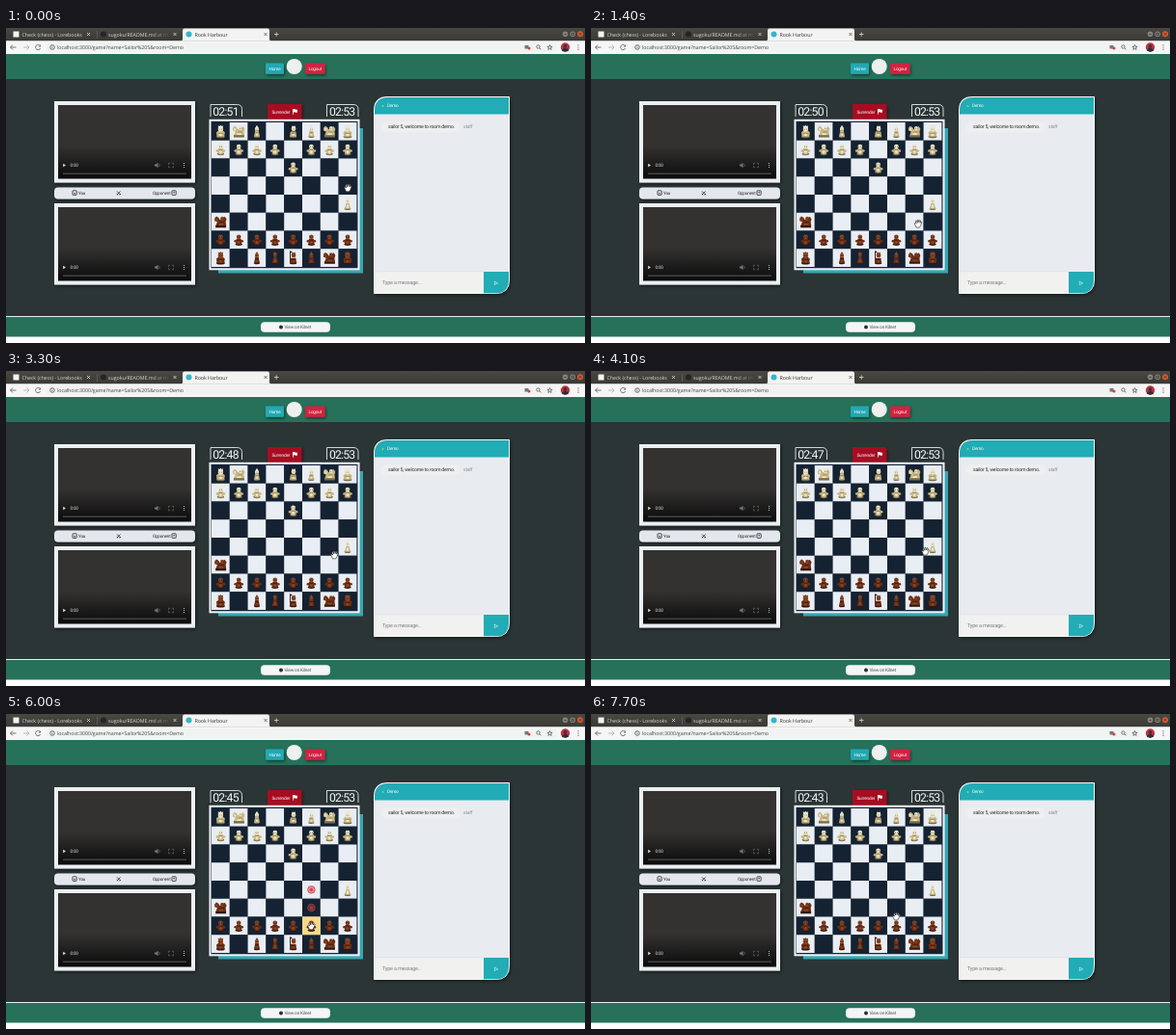
Recreate the animation shown at these times as an HTML page. Size 600x327 px, loop 8000 ms.

```html
<!DOCTYPE html>
<html lang="en">
<head>
<meta charset="utf-8">
<title>Chess room</title>
<style>
html, body { margin: 0; width: 100%; height: 100%; overflow: hidden; background: #fff; }
svg { display: block; width: 600px; height: 327px; }
text { font-family: Roboto, "Liberation Sans", sans-serif; letter-spacing: -.04em; text-rendering: geometricPrecision; }
.ui { font-family: "Open Sans", "Noto Sans", sans-serif; font-size: 5.3px; letter-spacing: -.01em; }
.ln { fill: none; stroke: currentColor; stroke-width: .8; }
.clock { font-size: 12.2px; letter-spacing: -.065em; fill: #f4f6f6; }
.white { --a: #eee6c8; --b: #c8b785; --c: #7a6c45; }
.brown { --a: #8a4623; --b: #6b2d14; --c: #34170b; }
.a { fill: var(--a); } .b { fill: var(--b); } .c { fill: var(--c); }
</style>
</head>
<body>
<svg viewBox="0 0 600 327">
  <defs>
    <linearGradient id="vid" x2="0" y2="1">
      <stop offset=".55" stop-color="#343231"/><stop offset="1" stop-color="#0b0b0b"/>
    </linearGradient>
    <linearGradient id="tabs" x2="0" y2="1">
      <stop stop-color="#4a4843"/><stop offset="1" stop-color="#3a3935"/>
    </linearGradient>
    <linearGradient id="fade">
      <stop offset=".7" stop-color="#dad8d3"/><stop offset="1" stop-color="#dad8d3" stop-opacity=".15"/>
    </linearGradient>
    <filter id="soft" x="-20%" y="-20%" width="140%" height="150%">
      <feDropShadow dx="1" dy="1.500" stdDeviation="1.500" flood-opacity=".5"/>
    </filter>
    <clipPath id="face"><circle cx="579.500" cy="20" r="4.700"/></clipPath>

    <g id="pawn">
      <ellipse class="c" cy="5.300" rx="4.200" ry="1.600"/>
      <circle class="b" cx="-4" cy="1.500" r="1.500"/><circle class="b" cx="4" cy="1.500" r="1.500"/>
      <ellipse class="b" cy="2" rx="3.500" ry="3.800"/>
      <circle class="a" cy="-3.500" r="2.700"/>
      <path class="c" d="M-1.600-3.700h1v1h-1zM.700-3.700h1v1h-1zM-2 .300h4v.700h-4z"/>
      <ellipse class="a" cy="3" rx="1.500" ry="1.600"/>
    </g>
    <g id="rook">
      <ellipse class="c" cy="6" rx="5" ry="1.800"/>
      <path class="b" d="M-5 1q5-5 10 0l-.700 5h-8.600z"/>
      <circle class="a" cy="-2.700" r="3"/>
      <path class="a" d="M-2.700-4l-.300-3 1.700 1L0-7.500 1.300-6 3-7l-.300 3z"/>
      <path class="c" d="M-1.700-3h1v1h-1zM.700-3h1v1h-1zM-3 2h6v.800h-6z"/>
      <ellipse class="a" cy="4" rx="1.800" ry="1.400"/>
    </g>
    <g id="knight">
      <path class="c" d="M-6 4H6.500v3H-6z"/>
      <path class="b" d="M-7-4l2-2.500 2.500 1.500 1.500 2.500 3-1 3-2.500L7-3 6 0l.500 4.500H-5.500L-4 0l-3-1z"/>
      <circle class="a" cx="2" cy="-3.700" r="2.300"/>
      <path class="a" d="M-5.500-4.500l2 1v3l-2-1zM-2 2h5v2h-5z"/>
      <path class="c" d="M1-4h.900v1H1zM3-4h.900v1H3zM-1 .300h5V1h-5z"/>
    </g>
    <g id="bishop">
      <ellipse class="c" cy="6" rx="3.500" ry="1.500"/>
      <path class="b" d="M-2-1h4l1.400 7h-6.800z"/>
      <path class="a" d="M0-7.500Q3-4 2.300-1h-4.600Q-3-4 0-7.500z"/>
      <path class="c" d="M-1.400-3h.900v1h-.900zM.600-3h.900v1H.600zM-2 1h4v.700h-4z"/>
      <path class="a" d="M-.900 3H.900v2H-.900z"/>
    </g>
    <g id="queen">
      <ellipse class="c" cy="6" rx="3.800" ry="1.500"/>
      <path class="b" d="M-1.600-1h3.200L3.600 6h-7.200z"/>
      <circle class="a" cy="-3" r="2.100"/>
      <path class="a" d="M-2-4l-.300-2.500L-1-5.500 0-8l1 2.500 1.300-1L2-4zM-.800 1H.800L1.500 5h-3z"/>
      <path class="c" d="M-1.300-3.300h.800v.900h-.800zM.500-3.300h.800v.900H.500z"/>
    </g>
    <g id="king">
      <path fill="#171410" d="M-4-8.500l3 1.200-2 1.600V6h-1z"/>
      <ellipse class="c" cy="6" rx="4.200" ry="1.600"/>
      <path class="b" d="M-3.200 0h6.400L4 6h-8z"/>
      <circle class="a" cx=".500" cy="-3" r="2.700"/>
      <path class="a" d="M-2-4.500L-1-7l1.500 1.200L2-7l1 2.500z"/>
      <path class="c" d="M-.900-3.300h.900v1h-.900zM1.300-3.300h.900v1h-.900zM-2 1.500h4.500v.800H-2z"/>
      <path class="a" d="M-1 3h2.500v2H-1z"/>
    </g>
    <g id="video">
      <rect width="146" height="84.500" fill="#eceff1" filter="url(#soft)"/>
      <rect x="4" y="4" width="138" height="76.500" fill="url(#vid)"/>
      <path fill="#ddd" d="M9.200 64.700l2.800 1.800-2.800 1.800z"/>
      <text x="16.500" y="68.200" font-size="4.700" fill="#ddd">0:00</text>
      <g fill="#777"><path d="M104 65.500h1.500l2-1.700v5.400l-2-1.700H104z"/>
      <circle cx="134.500" cy="64.500" r=".6" fill="#ccc"/><circle cx="134.500" cy="66.500" r=".6" fill="#ccc"/><circle cx="134.500" cy="68.500" r=".6" fill="#ccc"/></g>
      <path class="ln" color="#666" d="M108.600 65q1.300 1.500 0 3M118.500 65.800v-1.500h1.500m2 0h1.500v1.500m0 1.500v1.500h-1.500m-2 0h-1.500v-1.500"/>
      <path fill="#777" d="M9 74.700h128v.9H9z"/>
    </g>
    <path id="clockbox" d="M.500 13V.500H28q5 0 5 5V13" fill="#2a3333" stroke="#e6eaea" stroke-width=".9"/>
    <path id="x" class="ln" d="M-1.500-1.500l3 3m0-3l-3 3"/>
  </defs>

  <!-- browser -->
  <rect width="600" height="13.500" fill="url(#tabs)"/>
  <path d="M181 13.500q2 0 2-2V2.500q0-2 2-2h86q2 0 2 2v9q0 2 2 2z" fill="#f3f3f2"/>
  <path d="M94.500 3v8" stroke="#6d6a64" stroke-width=".6"/>
  <rect x="7.500" y="3.500" width="6" height="6" fill="#f4f4f4"/>
  <circle cx="101" cy="6.500" r="3" fill="#22262a"/>
  <circle cx="189.500" cy="6.500" r="3" fill="#35b5c9"/>
  <text class="ui" x="16.500" y="8.500" fill="#dad8d3">Check (chess) - Lorebooks</text>
  <text class="ui" x="106" y="8.500" fill="url(#fade)">sugoku/README.md at m</text>
  <text class="ui" x="195.500" y="8.500" fill="#333">Rook Harbour</text>
  <g color="#dad8d3"><use href="#x" x="85.500" y="6.500"/><use href="#x" x="175" y="6.500"/>
    <path class="ln" d="M278 6.500h4.500M280.200 4.300v4.500"/></g>
  <g fill="#85837d"><circle cx="579.500" cy="6.300" r="2.800"/><circle cx="587.200" cy="6.300" r="2.800"/><circle cx="595" cy="6.300" r="3" fill="#e4572f"/></g>
  <g color="#3a3935"><path class="ln" d="M578.200 6.500h2.600M586 5.200h2.400v2.200H586z"/><use href="#x" x="595" y="6.300"/></g>
  <use href="#x" x="269" y="6.500" color="#555"/>
  <rect y="13.500" width="600" height="13.500" fill="#f6f6f6"/>
  <rect x="41.500" y="14.800" width="529" height="10.500" rx="5.200" fill="#f1f2f2"/>
  <g color="#555">
    <path class="ln" d="M10.500 20H4.500m2.500-2.500L4.500 20 7 22.500M35.300 18.500a2.600 2.600 0 1 0 .300 2.500m0-3.500v1.700h-1.700"/>
    <path class="ln" color="#aaa" d="M18 20h6m-2.500-2.500L24 20l-2.500 2.500"/>
    <circle class="ln" cx="48" cy="20" r="2.300"/><path class="ln" d="M48 19.700v1.500M48 18.500v.5"/>
    <path fill="#777" d="M537.500 18h4v3.500h-4z"/><circle cx="542" cy="21" r="1.500" fill="#d2403c"/>
    <circle class="ln" cx="551.500" cy="19.500" r="1.700"/><path class="ln" d="M552.700 20.700l1.600 1.600"/>
    <path class="ln" stroke-width=".6" d="M563.500 17.500l.7 1.800 1.900.1-1.500 1.200.5 1.800-1.600-1.100-1.600 1.100.5-1.800-1.500-1.200 1.900-.1z"/>
  </g>
  <text class="ui" x="53" y="22" fill="#444">localhost:3000/game?name=Sailor%205&amp;room=Demo</text>
  <g clip-path="url(#face)"><path fill="#c03145" d="M574 15h11v11h-11z"/><circle cx="579.500" cy="19" r="1.900" fill="#4a302c"/><ellipse cx="579.500" cy="24" rx="3.700" ry="3" fill="#29303a"/></g>
  <g fill="#555"><circle cx="593" cy="17.800" r=".6"/><circle cx="593" cy="20" r=".6"/><circle cx="593" cy="22.200" r=".6"/></g>

  <!-- page -->
  <rect y="53" width="600" height="247" fill="#2b3536"/>
  <rect y="27" width="600" height="26" fill="#27715a"/>
  <g filter="url(#soft)">
    <rect x="269" y="36.500" width="19" height="11.300" rx="1" fill="#22a9b3"/>
    <rect x="310" y="36.500" width="20.500" height="11.300" rx="1" fill="#d3203f"/>
  </g>
  <g fill="#fff" font-size="4.700">
    <text x="278.500" y="44" text-anchor="middle">Home</text>
    <text x="320.300" y="44" text-anchor="middle">Logout</text>
  </g>
  <circle cx="298.700" cy="40" r="8" fill="#eef0ef"/>

  <use href="#video" x="50" y="76"/>
  <use href="#video" x="50" y="182"/>
  <rect x="50" y="165.500" width="146" height="12" rx="4" fill="#e4e8ee" filter="url(#soft)"/>
  <g color="#222" fill="#222" font-size="4.600">
    <rect class="ln" x="69" y="168.800" width="4.200" height="4.600" rx=".6"/><path d="M70 171.200h2.200l-1.100 1.500z"/>
    <text x="75" y="173">You</text>
    <path class="ln" d="M115 169.500l3.600 3.600m0-3.600l-3.600 3.600M114.700 172l1.300 1.300m3-1.300l-1.300 1.300"/>
    <text x="152" y="173">Opponent</text>
    <rect class="ln" x="172" y="168.800" width="4.200" height="4.600" rx=".6"/><path d="M173 171.200h2.200l-1.100-1.500z"/>
  </g>

  <use href="#clockbox" x="211.500" y="79"/><use href="#clockbox" x="332" y="79"/>
  <text id="mine" class="clock" x="214.300" y="91.200"></text>
  <text class="clock" x="335" y="91.200">02:53</text>
  <rect x="271" y="79" width="35.500" height="16" rx="1" fill="#a60b20" filter="url(#soft)"/>
  <text x="275.500" y="88.700" font-size="4.700" fill="#fff">Surrender</text>
  <path fill="#fff" d="M297 84h.7v.4q1.300-.600 2.200 0t2 0v3.200q-1 .500-2 0t-2.200 0v2.200h-.7z"/>

  <rect x="220" y="104" width="150" height="150.500" fill="#37a6b1"/>
  <rect x="210.500" y="94.800" width="156" height="156.500" fill="#f2f6f9"/>
  <rect x="212.500" y="96.800" width="152" height="152.500" fill="#1a2640"/>
  <g id="board"></g>

  <!-- chat -->
  <path d="M381.500 85q0-13.500 13.500-13.500H521.500V261q0 14.500-14 14.500H381.500z" fill="#e8ebf0" stroke="#f4f6f7" filter="url(#soft)"/>
  <path d="M382 89.500V86q0-14 14-14H521V89.500z" fill="#22acb5"/>
  <path d="M382 253h113v22.300H382z" fill="#f1f1f0"/>
  <path d="M382 252.800h113" stroke="#d9dde0" stroke-width=".6"/>
  <path d="M495 253h26v8q0 14.300-13 14.300H495z" fill="#22acb5"/>
  <circle cx="390.500" cy="81" r=".9" fill="#7be07f"/>
  <text x="395" y="82.300" font-size="4.700" fill="#fff">Demo</text>
  <rect x="389" y="97" width="82" height="11.500" rx="5" fill="#eeeff0"/>
  <text x="396" y="104.300" font-size="5.200" fill="#2c2c2c">sailor 5, welcome to room demo.</text>
  <text x="474" y="104" font-size="5" fill="#8a8d92">staff</text>
  <text x="390" y="266.300" font-size="5.500" fill="#7d7f82">Type a message...</text>
  <path d="M506 263l3.800 1.800-3.800 1.800.6-1.800z" fill="none" stroke="#d5f3f4" stroke-width=".6"/>

  <!-- footer -->
  <rect y="300" width="600" height="20.500" fill="#27715a"/>
  <rect y="299" width="600" height="1" fill="#e6efec"/>
  <rect x="264" y="305.300" width="72" height="10.500" rx="4" fill="#f3f5f6"/>
  <circle cx="285" cy="310.500" r="2" fill="#2b2f33"/>
  <text x="288.500" y="312.300" font-size="4.800" fill="#555">View on Kilnet</text>

  <g id="cursor" fill="#fff" stroke="#222" stroke-width=".6" stroke-linejoin="round">
    <path id="open" d="M-3.500-.500l1-.5 1 1-.8-3 1-.4 1 2.300V-4h1.100l.3 2.500.8-2.200 1 .3-.4 2.500.8-1.200.9.500L3 1.500 1.800 3.800h-3.300z"/>
    <path id="point" d="M-2.300-4h1.200l.3 2.800L3 0q.8.700.3 2L2.500 4h-4L-4 .8l.6-.8 1.300.8z"/>
  </g>
</svg>
<script>
const NS = "http://www.w3.org/2000/svg";
const X0 = 213, Y0 = 98, W = 18.8, H = 18.75;
const $ = id => document.getElementById(id);

function add(parent, tag, attrs) {
  const el = document.createElementNS(NS, tag);
  for (const k in attrs) el.setAttribute(k, attrs[k]);
  return parent.appendChild(el);
}
const midX = col => X0 + (col + .5) * W;
const midY = row => Y0 + (row + .5) * H;

const LAYOUT = ["RNB.KBNR", "PPPP.PPP", "....P...", "........",
                ".......Q", "n.......", "pppppppp", "r.bqkbnr"];
const KIND = { r: "rook", n: "knight", b: "bishop", q: "queen", k: "king", p: "pawn" };

const squares = add($("board"), "g", {});
const marks = add($("board"), "g", {});
const men = add($("board"), "g", {});
LAYOUT.forEach((line, row) => [...line].forEach((ch, col) => {
  add(squares, "rect", {
    x: X0 + col * W, y: Y0 + row * H, width: W, height: H,
    fill: (row + col) % 2 ? "#e9eef4" : "#142232"
  });
  if (ch !== ".") add(men, "use", {
    href: "#" + KIND[ch.toLowerCase()],
    class: ch < "a" ? "white" : "brown",
    transform: `translate(${midX(col)} ${midY(row)}) scale(.88)`
  });
}));

add(marks, "rect", { x: X0 + 5 * W, y: Y0 + 6 * H, width: W, height: H, fill: "#f6d98b" });
[["#ef8d8d", "#c9494f"], ["#712f34", "#a0393f"]].forEach(([fill, stroke], i) => {
  const dot = { cx: midX(5), cy: midY(4 + i) };
  add(marks, "circle", { ...dot, r: 3.8, fill, stroke, "stroke-width": .8 });
  add(marks, "circle", { ...dot, r: 1.6, fill: stroke });
});

const LOOP = 8000;
const TICKS = [700, 1700, 2700, 3700, 4700, 5800, 6700, 7700];
const PATH = [ // time, x, y
  [0, 354, 166], [700, 353.5, 165.5], [1500, 338, 205], [2200, 314, 233], [2500, 314, 233],
  [3000, 335, 197], [3300, 340, 191], [3900, 346, 187], [4900, 348, 190], [5300, 346, 192],
  [5800, 322, 214], [6000, 316, 220], [6300, 316, 220], [6800, 316, 211], [8000, 316, 210]
];

function place(t) {
  const i = PATH.findIndex(p => p[0] > t);
  const [a, b] = [PATH[i - 1], PATH[i]];
  const u = (t - a[0]) / (b[0] - a[0]);
  const e = u * u * (3 - 2 * u);
  return [a[1] + (b[1] - a[1]) * e, a[2] + (b[2] - a[2]) * e];
}

function draw(now) {
  const t = Math.floor((now % LOOP) / 100) * 100;
  $("mine").textContent = "02:" + (51 - TICKS.filter(k => t >= k).length);
  marks.style.display = t >= 6000 && t < 6800 ? "" : "none";
  const pointing = t >= 400 && t < 1200;
  $("point").style.display = pointing ? "" : "none";
  $("open").style.display = pointing ? "none" : "";
  $("cursor").setAttribute("transform", `translate(${place(t)})`);
}

const start = performance.now();
function frame() {
  draw(Math.max(0, performance.now() - start));
  requestAnimationFrame(frame);
}
frame();
</script>
</body>
</html>
```
